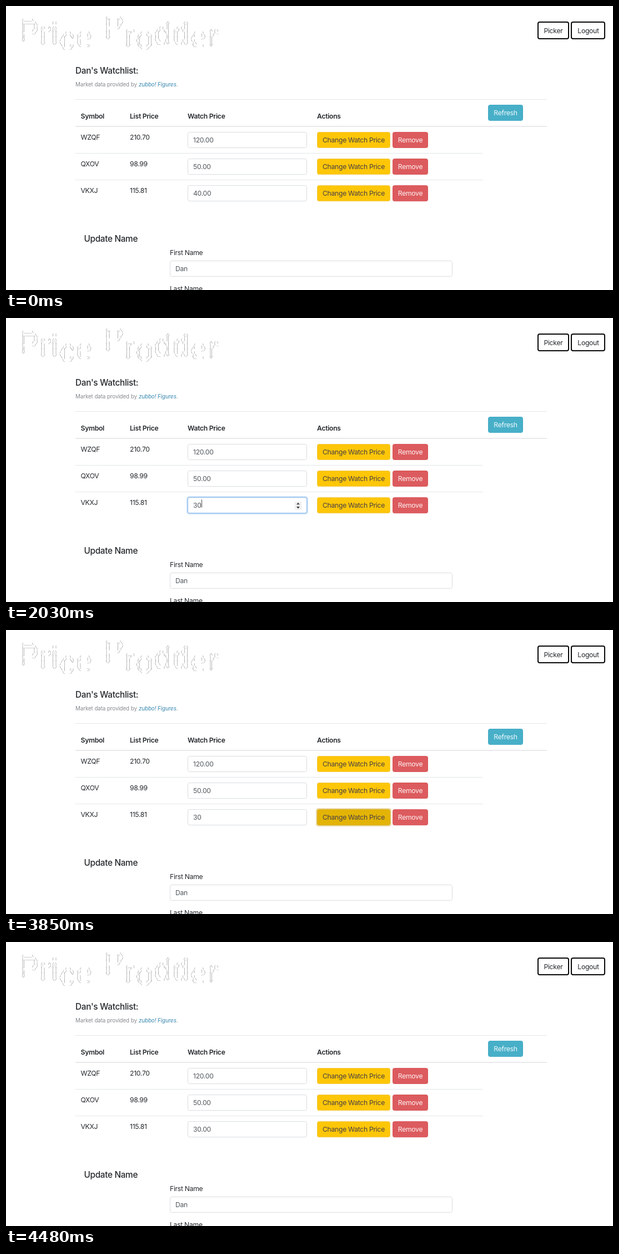
An HTML page with a canvas for the animation above (4.76 s loop, 1093 px wide and 512 px high).

```html
<!DOCTYPE html>
<html lang="en">
<head>
<meta charset="utf-8">
<title>Watchlist</title>
<style>
  html, body { margin: 0; width: 100%; height: 100%; overflow: hidden; background: #fff; }
  #mark { position: absolute; left: 0; top: 0; }
  svg {
    position: absolute; left: 0; top: 0; display: block;
    font: 12.2px Inter, "Open Sans", sans-serif; letter-spacing: -.3px; fill: #24282c;
    --yellow: #fdc608; --yellow-edge: #f1cb4b; --ink: #483f45;
    --red: #dc5b5e; --red-edge: #d9575b; --red-ink: #fdf3f4;
    --teal: #48afc8; --teal-edge: #45abc4; --teal-ink: #f2fafc;
    --edge: #d9dcdf; --hot: #fdc608; --hot-edge: #f1cb4b;
  }
  svg, .sel, .caret, .focus, .glow, .value text { animation: 4760ms step-end infinite; }
  svg { animation-name: page; }
  text { white-space: pre; }
  .head { font-weight: 600; }
  .title { font-size: 15.3px; font-weight: 500; }
  .small { font-size: 9.8px; letter-spacing: -.09px; fill: #85898d; }
  .link { fill: #3585ad; font-style: italic; }
  .nav { fill: #fff; stroke: #090909; stroke-width: 2; }
  .field { fill: #fff; stroke: var(--edge); }
  .typed { fill: #51575d; }
  .mid { text-anchor: middle; }
  .yellow { fill: var(--yellow); stroke: var(--yellow-edge); }
  .hot { fill: var(--hot); stroke: var(--hot-edge); }
  .red { fill: var(--red); stroke: var(--red-edge); }
  .teal { fill: var(--teal); stroke: var(--teal-edge); }
  .ink { fill: var(--ink); }
  .red-ink { fill: var(--red-ink); }
  .teal-ink { fill: var(--teal-ink); }
  .sel { fill: #a8cbee; animation-name: sel; }
  .caret { fill: #333; animation-name: caret; }
  .focus { animation-name: focus; }
  .glow { fill: none; stroke: #ead9a0; stroke-width: 2.4; animation-name: glow; }
  .v1 { animation-name: v1 !important; }
  .v2 { animation-name: v2 !important; }
  .v3 { animation-name: v3 !important; }
  .v4 { animation-name: v4 !important; }

  /* hover and press on the last row, then the reload fade-in */
  @keyframes page {
    51.4% { --hot: #f0bd07; --hot-edge: #e6bd3c; }
    52.9% { --hot: #e3b406; --hot-edge: #d9ac1c; }
    82.3% {
      --yellow: #f8e4a8; --yellow-edge: #8f8a78; --ink: #111214;
      --red: #edb9ba; --red-edge: #8d7678; --red-ink: #8d7c94;
      --teal: #aed5de; --teal-edge: #72868b; --teal-ink: #7f8a8d;
      --edge: #9c9fa2; --hot: #f8e4a8; --hot-edge: #8f8a78;
    }
    83.8% {
      --yellow: #fed65a; --yellow-edge: #cdb463; --ink: #26292c;
      --red: #ea8587; --red-edge: #c07b7e; --red-ink: #e3c6f2;
      --teal: #70c0d2; --teal-edge: #62a6b5; --teal-ink: #bfd0d5;
      --edge: #bcbfc2; --hot: #fed65a; --hot-edge: #cdb463;
    }
    85.2% {
      --yellow: #fecb25; --yellow-edge: #ebc855; --ink: #383539;
      --red: #e06a6d; --red-edge: #d4676a; --red-ink: #f6e5f6;
      --teal: #55b5cc; --teal-edge: #4caac2; --teal-ink: #e3f0f4;
      --edge: #d2d5d8; --hot: #fecb25; --hot-edge: #ebc855;
    }
    86.7% {
      --yellow: #fdc608; --yellow-edge: #f1cb4b; --ink: #483f45;
      --red: #dc5b5e; --red-edge: #d9575b; --red-ink: #fdf3f4;
      --teal: #48afc8; --teal-edge: #45abc4; --teal-ink: #f2fafc;
      --edge: #d9dcdf; --hot: #fdc608; --hot-edge: #f1cb4b;
    }
  }
  @keyframes focus {
    0%, 57.3%, to { opacity: 0; }
    22% { opacity: .55; }
    23.5% { opacity: 1; }
    55.8% { opacity: .45; }
  }
  @keyframes glow {
    0%, 82.3%, to { opacity: 0; }
    55.8% { opacity: .5; }
    57.3% { opacity: 1; }
  }
  @keyframes sel { 0%, 38.2%, to { opacity: 0; } 26.4% { opacity: 1; } }
  @keyframes caret {
    0%, 51.4%, to { opacity: 0; transform: translateX(0); }
    38.2% { opacity: 1; transform: translateX(0); }
    41.1% { opacity: 1; transform: translateX(7.5px); }
  }
  @keyframes v1 { 0% { opacity: 1; } 38.2%, to { opacity: 0; } }
  @keyframes v2 { 0%, 41.1%, to { opacity: 0; } 38.2% { opacity: 1; } }
  @keyframes v3 { 0%, 82.3%, to { opacity: 0; } 41.1% { opacity: 1; } }
  @keyframes v4 { 0% { opacity: 0; } 82.3%, to { opacity: 1; } }
</style>
</head>
<body>
<canvas id="mark" width="400" height="92"></canvas>
<svg id="stage" width="1093" height="512" viewBox="0 0 1093 512"></svg>
<script>
  const box = (x, y, w, h, cls) =>
    `<rect class="${cls}" x="${x}" y="${y}" width="${w}" height="${h}" rx="3"/>`;
  const text = (x, y, str, cls = '') => `<text class="${cls}" x="${x}" y="${y}">${str}</text>`;
  const line = (y, end, color, w = 1) =>
    `<path d="M125 ${y}H${end}" stroke="${color}" stroke-width="${w}"/>`;

  const row = ([symbol, price, watch], i) => {
    const y = 227.5 + i * 48.1, last = i === 2;
    const base = y + 18.6;
    const value = last
      ? `<g class="value">${['40.00', '3', '30', '30.00'].map((v, k) =>
          text(337, base, v, `typed v${k + 1}`)).join('')}</g>`
      : text(337, base, watch, 'typed');
    const active = last ? `
      <g class="focus">
        <rect x="326.3" y="${y - 1.2}" width="216.4" height="30.4" rx="4" fill="none" stroke="#c3dcf8" stroke-width="2.4"/>
        <rect x="327.5" y="${y}" width="214" height="28" rx="3" fill="none" stroke="#8dbdec"/>
        <rect x="519.5" y="${y + 7}" width="13" height="15" rx="2" fill="#f1f1f1"/>
        <path d="M523 ${y + 12.6}l3-3.6 3 3.6zM523 ${y + 16.4}l3 3.6 3-3.6z" fill="#444"/>
      </g>
      <rect class="sel" x="337" y="${y + 3.5}" width="32" height="14.5"/>` : '';
    const caret = last ? `<rect class="caret" x="344.4" y="${y + 3.5}" width="1" height="14.5"/>` : '';
    const glow = last ? box(559.3, y - 1.2, 133.4, 30.4, 'glow') : '';
    return text(134.5, y + 13.4, symbol) + text(223, y + 13.4, price)
      + box(327.5, y, 214, 28, 'field') + active + value + caret
      + glow + box(560.5, y, 131, 28, last ? 'hot' : 'yellow')
      + text(626, base, 'Change Watch Price', 'mid ink')
      + box(696.5, y, 63, 28, 'red') + text(728, base, 'Remove', 'mid red-ink');
  };

  const heads = [[134.5, 'Symbol'], [223, 'List Price'], [327, 'Watch Price'], [560, 'Actions']];
  const rows = [['WZQF', '210.70', '120.00'], ['QXOV', '98.99', '50.00'], ['VKXJ', '115.81']];

  document.getElementById('stage').innerHTML = [
    box(958, 29, 55, 30, 'nav'), text(985.5, 48.8, 'Picker', 'mid'),
    box(1018, 29, 60, 30, 'nav'), text(1048.5, 48.8, 'Logout', 'mid'),
    text(125, 121.8, "Dan's Watchlist:", 'title'),
    text(125, 145.3, 'Market data provided by', 'small'),
    `<text class="small" x="239" y="145.3"><tspan class="link">zubbo! Figures</tspan>.</text>`,
    line(168.5, 974, '#e5e5e5'), line(217, 974, '#e0e3e6', 1.6),
    line(265.5, 859, '#e3e6e9'), line(313.5, 859, '#e3e6e9'),
    ...heads.map(([x, s]) => text(x, 202.5, s, 'head')),
    box(868.5, 178.5, 62, 28, 'teal'), text(899.5, 197.2, 'Refresh', 'mid teal-ink'),
    ...rows.map(row),
    text(140.5, 425, 'Update Name', 'title'),
    text(295, 448.5, 'First Name'),
    box(295.5, 459.5, 508, 28, 'field'), text(305, 478.3, 'Dan', 'typed'),
    text(295, 514.3, 'Last Name')
  ].join('');

  // Wordmark: staggered letters whose outlines are set in tiny characters.
  const W = 400, H = 92, cw = 2.6, ch = 4.6;
  const mask = new OffscreenCanvas(W, H).getContext('2d', { willReadFrequently: true });
  mask.font = 'bold 60px "Liberation Sans", Arial, sans-serif';
  mask.scale(.9, 1);
  let x = 24 / .9;
  [...'Price Prodder'].forEach((c, i) => {
    mask.fillText(c, x, 66 + [0, 4, 4, 13, 10, 0, -8, 6, 12, 4, 4, 10, 7][i]);
    x += c === ' ' ? 22 : mask.measureText(c).width;
  });
  const px = mask.getImageData(0, 0, W, H).data;
  const inside = (c, r) => {
    const u = Math.round((c + .5) * cw), v = Math.round((r + .5) * ch);
    return u >= 0 && v >= 0 && u < W && v < H && px[(v * W + u) * 4 + 3] > 127 ? 1 : 0;
  };
  const pen = document.getElementById('mark').getContext('2d');
  pen.font = '5px "Liberation Mono", "DejaVu Sans Mono", monospace';
  pen.fillStyle = '#555';
  for (let r = 0; r < H / ch; r++) {
    for (let c = 0; c < W / cw; c++) {
      if (!inside(c, r)) continue;
      const gx = inside(c + 1, r) - inside(c - 1, r);
      const gy = inside(c, r + 1) - inside(c, r - 1);
      if (!gx && !gy) continue;
      const glyph = gx && gy ? (gx === gy ? '/' : '\\') : gx ? '|' : '_';
      pen.fillText(glyph, c * cw, (r + .9) * ch);
    }
  }
</script>
</body>
</html>
```
